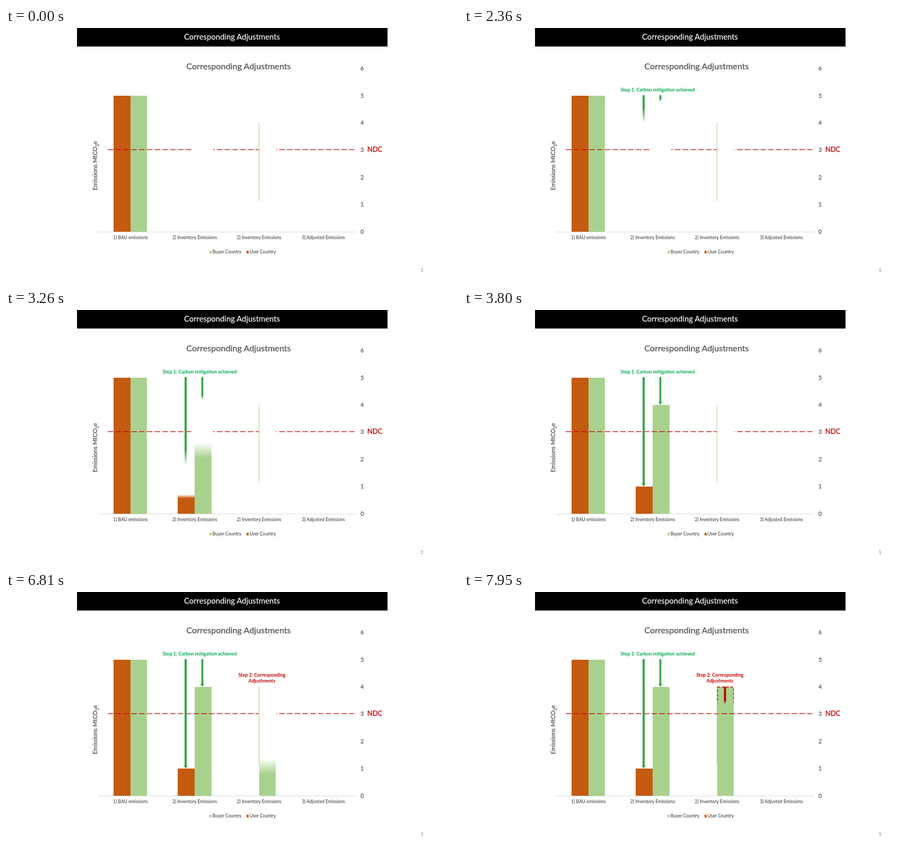
Recreate the animation shown at these times as an HTML page. Size 853x480 px, loop 8 s.

```html
<!DOCTYPE html>
<html lang="en">
<head>
<meta charset="utf-8">
<title>Corresponding Adjustments</title>
<style>
  html, body { margin: 0; width: 100%; height: 100%; overflow: hidden; background: #fff; }
  svg { display: block; width: 853px; height: 480px; font-family: Lato, "Open Sans", sans-serif; }
</style>
</head>
<body>
<svg id="stage" viewBox="0 0 853 480"></svg>
<script>
const LOOP = 8000, STEP = 60, SOFT = 0.14;
const ORANGE = '#c55a11', GREEN = '#a9d18e', ARROW = '#35a44a', RED = '#c00000', GREY = '#505050', INK = '#303030';
const BASE = 385, UNIT = 51.4, NDC_Y = 229.8;

// Soft-edged wipes: axis, edge coordinates from/to, start and duration in ms
const wipes = {
  step1:     { axis: 'x', from: 292, to: 439, start: 610,  dur: 720 },
  longArrow: { axis: 'y', from: 127, to: 333, start: 1940, dur: 1860 },
  shortArrow:{ axis: 'y', from: 127, to: 179, start: 1940, dur: 1860 },
  userBar:   { axis: 'y', from: 385, to: 334, start: 2660, dur: 960 },
  buyerBar:  { axis: 'y', from: 385, to: 179, start: 2660, dur: 1050 },
  step2:     { axis: 'x', from: 435, to: 531, start: 4870, dur: 840 },
  tradeBar:  { axis: 'y', from: 385, to: 179, start: 6450, dur: 1200 },
  transfer:  { axis: 'y', from: 179, to: 231, start: 7650, dur: 540 },
};

const rect = (x, y, w, h, fill) => `<rect x="${x}" y="${y}" width="${w}" height="${h}" fill="${fill}"/>`;
const bar = (x, value, w, fill) => rect(x, BASE - value * UNIT, w, value * UNIT, fill);
const text = (x, y, size, fill, str, extra = '') =>
  `<text x="${x}" y="${y}" font-size="${size}" fill="${fill}" text-anchor="middle" ${extra}>${str}</text>`;
const heavy = (color, width = 0.25) => `stroke="${color}" stroke-width="${width}"`;
const target = (x1, x2) =>
  `<path d="M${x1} ${NDC_Y}H${x2}" stroke="${RED}" stroke-width="1.35" stroke-dasharray="10.6 4.1" stroke-dashoffset="${x1 - 192}"/>`;
const arrow = (x, top, tip, w, fill) =>
  rect(x - w / 2, top, w, tip - top - 4, fill) +
  `<path d="M${x - w} ${tip - 5}H${x + w}L${x} ${tip}Z" fill="${fill}"/>`;
const reveal = (id, content) => `<g mask="url(#mask-${id})">${content}</g>`;

const masks = Object.keys(wipes).map(id => `
  <linearGradient id="${id}" gradientUnits="userSpaceOnUse" x1="0" y1="0" x2="0" y2="0">
    <stop offset="0" stop-color="#fff"/><stop offset="1" stop-color="#fff" stop-opacity="0"/>
  </linearGradient>
  <mask id="mask-${id}" maskUnits="userSpaceOnUse" x="0" y="0" width="853" height="480">
    ${rect(0, 0, 853, 480, `url(#${id})`)}
  </mask>`).join('');

const categories = ['1) BAU emissions', '2) Inventory Emissions', '2) Inventory Emissions', '3) Adjusted Emissions'];
const bold = 'font-weight="700"';

document.getElementById('stage').innerHTML = `<defs>${masks}</defs>` +
  rect(134, 0, 586, 35, '#000') +
  text(426.5, 22, 14.85, '#fff', 'Corresponding Adjustments', heavy('#fff', 0.15)) +
  text(439, 78, 16.2, GREY, 'Corresponding Adjustments', heavy(GREY)) +
  text(0, 0, 11.4, GREY, 'Emissions MtCO<tspan font-size="7.6" dy="2.5">2</tspan><tspan dy="-2.5">e</tspan>',
    `transform="translate(172 260) rotate(-90)" ${heavy(GREY)}`) +
  [0, 1, 2, 3, 4, 5, 6].map(n => text(672, 388.5 - n * UNIT, 10.6, GREY, n, heavy(GREY))).join('') +
  categories.map((name, i) => text(234.7 + i * 121.4, 399, 8.55, INK, name)).join('') +
  rect(384, 421, 4, 5, GREEN) + text(417, 426, 8.5, INK, 'Buyer Country') +
  rect(454, 421, 4, 5, ORANGE) + text(484.5, 426, 8.5, INK, 'User Country') +
  text(696, 234, 13, RED, 'NDC', heavy(RED)) +
  text(785, 461, 10.4, '#8b8b8b', '1') +
  rect(174, 385, 486, 1, '#d9d9d9') +
  bar(203, 5, 32, ORANGE) + bar(235, 5, 31, GREEN) +
  target(192, 353) + target(391, 478) + target(510, 657.5) +
  reveal('userBar', bar(324, 1, 32, ORANGE)) +
  reveal('buyerBar', bar(356, 4, 32, GREEN) + target(353, 391)) +
  reveal('tradeBar', bar(478, 4, 31, GREEN) + target(478, 510)) +
  rect(477, 179, 1, 148, GREEN) +
  reveal('step1', text(365.5, 120, 9, '#00a84c', 'Step 1: Carbon mitigation achieved', bold)) +
  reveal('longArrow', arrow(339, 127, 333, 4, ARROW)) +
  reveal('shortArrow', arrow(370.5, 127, 179, 3.6, ARROW)) +
  reveal('step2', text(482.8, 160, 9, RED, 'Step 2: Corresponding', bold) +
    text(482.8, 171, 9, RED, 'Adjustments', bold)) +
  reveal('transfer', `<rect x="478.5" y="179.5" width="30" height="51" fill="none" stroke="${RED}" stroke-width="1.3" stroke-dasharray="5 3"/>` +
    arrow(492.5, 179, 231, 4, RED));

function draw(now) {
  const t = now % LOOP;
  for (const [id, { axis, from, to, start, dur }] of Object.entries(wipes)) {
    const elapsed = Math.floor((t - start) / STEP) * STEP;
    const front = Math.min(1, Math.max(0, elapsed / dur)) * (1 + SOFT);
    const gradient = document.getElementById(id);
    gradient.setAttribute(axis + '1', from + (to - from) * (front - SOFT));
    gradient.setAttribute(axis + '2', from + (to - from) * front);
  }
}

const origin = performance.now();
function tick() {
  draw(performance.now() - origin);
  requestAnimationFrame(tick);
}
tick();
</script>
</body>
</html>
```
